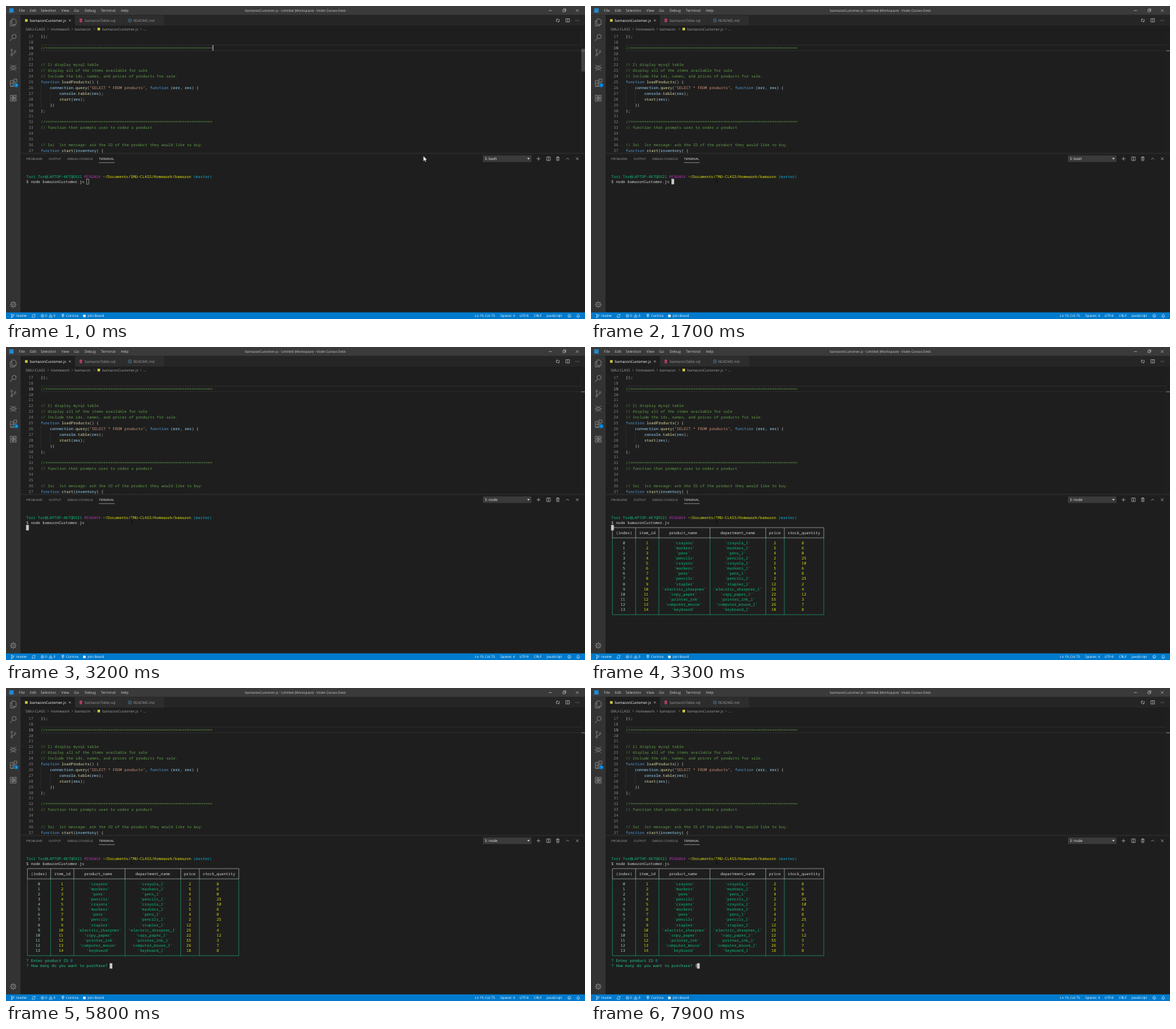
These frames come from a looping animation (800x433 px, 8000 ms). An HTML page:

```html
<!DOCTYPE html>
<html lang="en">
<head>
<meta charset="utf-8">
<title>Editor with terminal</title>
<style>
  html, body { margin: 0; width: 100%; height: 100%; overflow: hidden; background: #1e1e1e; }
  svg { display: block; width: 100vw; height: 100vh; }
  text { white-space: pre; text-rendering: geometricPrecision; }
  .ui { font-family: "Open Sans", "Noto Sans", sans-serif; }
  .mono { font-family: "Noto Sans Mono", "DejaVu Sans Mono", monospace; font-size: 5.35px; }
</style>
</head>
<body>
<svg id="stage" viewBox="0 0 800 433"></svg>
<script>
const CHAR = 3.21, TERM_X = 28, TERM_Y = 235.7, TERM_LINE = 7.083;
const CODE_X = 48, CODE_LINE = 7.9;
const COLORS = {
  c: '#5f9c48', k: '#569cd6', f: '#dcdcaa', v: '#9cdcfe', s: '#ce9178', w: '#d0d0d0',
  g: '#0dbc79', m: '#a535a5', y: '#e0e010', b: '#11a8cd', p: '#23c78b', i: '#a5d6bd'
};

const rect = (x, y, w, h, fill, extra = '') =>
  `<rect x="${x}" y="${y}" width="${w}" height="${h}" fill="${fill}" ${extra}/>`;
const path = (d, stroke = '#c5c5c5', width = .6, extra = '') =>
  `<path d="${d}" stroke="${stroke}" stroke-width="${width}" fill="none" ${extra}/>`;
const circle = (x, y, r, stroke, width = .6, fill = 'none') =>
  `<circle cx="${x}" cy="${y}" r="${r}" stroke="${stroke}" stroke-width="${width}" fill="${fill}"/>`;
const label = (x, y, str, fill = '#ccc', size = 5.04, anchor = 'start') =>
  `<text class="ui" x="${x}" y="${y + 1.75}" fill="${fill}" font-size="${size}" text-anchor="${anchor}">${str}</text>`;
const cross = (x, y, r = 1.8, color) =>
  path(`M${x - r} ${y - r}l${2 * r} ${2 * r}m0 ${-2 * r}l${-2 * r} ${2 * r}`, color);

// Markup: pieces split by "|", each led by a one-letter colour key.
const mono = (x, y, markup) => `<text class="mono" x="${x}" y="${y + 1.8}">` +
  markup.split('|').map(p => `<tspan fill="${COLORS[p[0]]}">${p.slice(1)}</tspan>`).join('') + '</text>';
const codeY = line => 42 + (line - 17) * CODE_LINE;
const termX = col => TERM_X + col * CHAR;
const termY = row => TERM_Y + row * TERM_LINE;
const term = (row, markup) => mono(TERM_X, termY(row), markup);

function titleBar() {
  const menu = [['File', 18], ['Edit', 33], ['Selection', 48], ['View', 76.5], ['Go', 94],
    ['Debug', 108.5], ['Terminal', 131], ['Help', 158.5]];
  return rect(0, 0, 800, 12.5, '#3a3a3a') + rect(4.5, 3.2, 6, 6, '#1f8ad2') +
    menu.map(([name, x]) => label(x, 6.3, name)).join('') +
    label(400, 6.3, 'bamazonCustomer.js - Untitled (Workspace) - Violet Canvas Desk', '#ccc', 4.65, 'middle') +
    path('M750 6.3h4.4M769.5 5h3v3h-3zM770.6 5v-1.1h3v3h-1.1') + cross(789.3, 6.3);
}

function tabs() {
  return rect(20, 12.5, 780, 14.6, '#252526') + rect(20, 12.5, 75, 14.6, '#1e1e1e') +
    rect(95.4, 12.5, 66.4, 14.6, '#2d2d2d') + rect(162.2, 12.5, 56, 14.6, '#2d2d2d') +
    rect(26.3, 18.2, 3.6, 3.6, '#cbcb41') + label(33, 19.9, 'bamazonCustomer.js', '#fff') + cross(88.2, 20, 1.4) +
    rect(101.6, 17.6, 3.6, 4.8, '#d8417f', 'rx="1.4"') + path('M101.6 19.5h3.6m0 1.4h-3.6', '#2d2d2d', .4) +
    label(109, 19.9, 'bamazonTable.sql', '#999') +
    circle(171.3, 20, 2.2, '#519aba') + path('M171.3 18.6v.6m0 .5v1.6', '#519aba') +
    label(176, 19.9, 'README.md', '#999') +
    path('M760.5 22v-3.6h2m-1-1l1 1l-1 1M764.3 18v3.6h-2m1 1l-1-1l1-1M773.6 17.5h5v4.6h-5zM776.1 17.5v4.6') +
    [787.3, 789.3, 791.3].map(x => circle(x, 20, .45, 'none', 0, '#c5c5c5')).join('');
}

function breadcrumbs() {
  const parts = [['SMU-CLASS', 27], ['Homework', 62], ['bamazon', 95], ['bamazonCustomer.js', 133], ['...', 189.5]];
  return parts.map(([name, x]) => label(x, 31.8, name, '#a0a0a0')).join('') +
    [57.5, 91, 121.5, 186].map(x => path(`M${x} 30.6l1.2 1.3l-1.2 1.3`, '#999', .5)).join('') +
    rect(126.4, 30.1, 3.6, 3.6, '#cbcb41');
}

function activityBar() {
  const gray = '#8a8a8a';
  const teeth = Array.from({ length: 8 }, (_, i) => {
    const a = i * Math.PI / 4, c = Math.cos(a), s = Math.sin(a);
    return `M${10 + 3 * c} ${413 + 3 * s}l${1.4 * c} ${1.4 * s}`;
  }).join('');
  return rect(0, 12.5, 20.2, 411.4, '#333') +
    path('M8 18h4l2 2v5.5h-6zM8 20.5h-2v7h6v-2', gray, .8) +
    circle(11.2, 42.2, 2.9, gray, .8) + path('M9 44.5l-3.4 3.8', gray, .9) +
    circle(7.8, 60.8, 1.2, gray, .7) + circle(7.8, 68, 1.2, gray, .7) + circle(12.6, 62.8, 1.2, gray, .7) +
    path('M7.8 62v4.8M12.6 64q0 2-4.8 2.2', gray, .7) +
    circle(10, 85.5, 2.7, gray, .8) +
    path('M10 82.8v5.4M7.3 85.5h-2.3m10 0h-2.3M7.8 83.3l-1.8-2m6.2 2l1.8-2M7.8 87.7l-1.8 2m6.2-2l1.8 2', gray, .7) +
    path('M6 103h4v8h-4zM6 107h8v4h-8M11 101h4v4h-4z', gray, .8) +
    circle(14.2, 109.6, 2.9, 'none', 0, '#007acc') + label(14.2, 109.3, '1', '#fff', 3.6, 'middle') +
    path('M6 123.5h3.4v3.4h-3.4zM10.7 123.5h3.4v3.4h-3.4zM6 128.2h3.4v3.4h-3.4zM10.7 128.2h3.4v3.4h-3.4zM8 125l5 5M13 125l-5 5', gray, .8) +
    circle(10, 413, 3, gray, .8) + circle(10, 413, 1.1, gray, .6) + path(teeth, gray, 1.1);
}

function editor() {
  const rule = 'c//' + '='.repeat(72);
  const code = {
    17: 'w});', 19: rule, 22: 'c// 2) display mysql table',
    23: 'c// display all of the items available for sale',
    24: 'c// Include the ids, names, and prices of products for sale.',
    25: 'kfunction |floadProducts|w() {',
    26: 'v    connection|w.|fquery|w(|s"SELECT * FROM products"|w, |kfunction |w(|verr|w, |vres|w) {',
    27: 'v        console|w.|ftable|w(|vres|w);', 28: 'f        start|w(|vres|w);',
    29: 'w    })', 30: 'w};', 32: rule, 33: 'c// function that prompts user to order a product',
    36: 'c// 3a)  1st message: ask the ID of the product they would like to buy.',
    37: 'kfunction |fstart|w(|vinventory|w) {'
  };
  let out = path('M48 54h747M48 61.8h747', '#303030', .8) +
    path('M48.2 109v31.6M61 117v15.8', '#404040', .4);
  for (let n = 17; n <= 37; n++) {
    out += `<text class="mono" x="37.6" y="${codeY(n) + 1.8}" text-anchor="end" fill="${n === 19 ? '#c6c6c6' : '#858585'}">${n}</text>`;
    if (code[n]) out += mono(CODE_X, codeY(n), code[n]);
  }
  return out + path('M794.9 36v167.5', '#303030', .4) + rect(795, 61.5, 5, .9, '#8c8c8c') +
    rect(795, 59, 5, 31.5, '#797979', 'id="slider"') + rect(285.5, 54, .9, 7.8, '#d0d0d0', 'id="caret"');
}

function panel() {
  const names = [['PROBLEMS', 28], ['OUTPUT', 59], ['DEBUG CONSOLE', 84.5]];
  return rect(20.2, 203.6, 780, 220.4, '#1e1e1e') + path('M20.2 203.9h780', '#454545', .5) +
    names.map(([name, x]) => label(x, 211.3, name, '#969696', 4.35)).join('') +
    label(128.5, 211.3, 'TERMINAL', '#e7e7e7', 4.35) + path('M128.3 216.7h21.8', '#d0d0d0', .5) +
    rect(659, 206.6, 67, 9.2, '#3a3a3a') +
    '<text id="shell" class="ui" x="661.5" y="213" fill="#f0f0f0" font-size="5.04"></text>' +
    '<path d="M720.2 210.2h3.4l-1.7 2.2z" fill="#e0e0e0"/>' +
    path('M733.2 211.3h5.2m-2.6-2.6v5.2M747 208.8h5v5h-5zM749.5 208.8v5') +
    path('M760.2 209.5h4.4M761.5 209.3v-.8h1.8v.8M760.8 209.5v4.3h3.2v-4.3M762.4 210.3v2.8') +
    path('M774 212.3l2-2l2 2') + cross(789.3, 211.3);
}

function statusBar() {
  const names = [['master', 14], ['0', 54], ['0', 65.5], ['Corinna', 83], ['Join Board', 113],
    ['Ln 19, Col 75', 648], ['Spaces: 4', 683], ['UTF-8', 709.5], ['CRLF', 729.5], ['JavaScript', 747]];
  const white = '#fff';
  return rect(0, 423.8, 800, 9.2, '#007acc') +
    names.map(([name, x]) => label(x, 428.5, name, white, 4.65)).join('') +
    circle(8, 426.9, .7, white, .5) + circle(8, 430.7, .7, white, .5) + circle(10.5, 427.7, .7, white, .5) +
    path('M8 427.6v2.4M10.5 428.4q0 1-2.5 1.3', white, .5) +
    path('M36.2 428.5a2 2 0 0 1 3.7-.9M40.2 429a2 2 0 0 1-3.7.9M40.3 426.5v1.3h-1.4M36 431v-1.3h1.4', white, .5) +
    circle(50.4, 428.6, 1.9, white, .5) + cross(50.4, 428.6, .8, white) +
    path('M61.7 426.6l2.1 3.8h-4.2zM61.7 428v1.2', white, .5) +
    path('M78.6 426.4v2.6m-1.4-2.6h2.8v2.6h-2.8zM78.6 429v2', white, .5) +
    rect(106.6, 427, 3.4, 3.4, white) +
    circle(778.3, 428.6, 2, white, .5) + path('M777.2 429.2q1.1 1 2.2 0M777.5 427.7v.5m1.6-.5v.5', white, .5) +
    path('M788.5 430q.7-.6.7-1.8q0-1.7 1.4-1.7t1.4 1.7q0 1.2.7 1.8zM790 430.8h1.2', white, .5);
}

function table() {
  const products = ['crayons', 'markers', 'pens', 'pencils', 'crayons', 'markers', 'pens', 'pencils',
    'stapler', 'electric_sharpner', 'copy_paper', 'printer_ink', 'computer_mouse', 'keyboard'];
  const prices = [2, 5, 4, 2, 2, 5, 4, 2, 12, 25, 22, 55, 26, 18];
  const stock = [8, 6, 0, 25, 10, 6, 8, 25, 2, 4, 12, 3, 7, 8];
  const widths = [9, 9, 21, 23, 7, 16];
  const keys = ['i', 'y', 'g', 'g', 'y', 'y'];
  const center = (cell, w) => {
    const text = String(cell), gap = (w - text.length) / 2;
    return ' '.repeat(gap) + text + ' '.repeat(Math.ceil(gap));
  };
  const row = (cells, colors) => 'w |' + cells.map((c, i) => colors[i] + center(c, widths[i]) + ' ').join('|');

  let out = term(3, row(['(index)', 'item_id', 'product_name', 'department_name', 'price', 'stock_quantity'], 'wwwwww'));
  products.forEach((name, i) => {
    const dept = name === 'crayons' ? 'crayola_1' : name + '_1';
    out += term(5 + i, row([i, i + 1, `'${name}'`, `'${dept}'`, prices[i], stock[i]], keys));
  });

  let col = 0;
  const seps = [0, ...widths.map(w => col += w + 1)].map(c => termX(c + .5));
  const left = seps[0], right = seps[seps.length - 1];
  const [top, mid, bottom] = [2, 4, 19].map(termY);
  const verticals = (y1, y2) => seps.map(x => `M${x} ${y1}V${y2}`).join('');
  return out + path(verticals(mid, bottom) + `M${left} ${bottom}H${right}`, '#1fae78', .55) +
    path(verticals(top, mid) + `M${left} ${top}H${right}M${left} ${mid}H${right}`, '#bccbc4', .55);
}

function terminal() {
  return term(0, 'gTori Tor@LAPTOP-4K7QRX21 |mMINGW64 |y~/Documents/SMU-CLASS/Homework/bamazon |b(master)') +
    term(1, 'w$ node bamazonCustomer.js') +
    `<g id="table">${table()}</g>` +
    `<g id="askId">${term(20, 'p? Enter product ID')}</g><g id="idAnswer"></g>` +
    `<g id="askCount">${term(21, 'p? How many do you want to purchase?')}</g>` +
    `<g id="count">${term(21, 'w' + ' '.repeat(36) + '3')}</g>` +
    '<rect id="block" width="3.2" height="6.9" stroke="#ccc" stroke-width=".5"/>';
}

const pointer = '<g id="pointer">' +
  '<path id="arrow" d="M0 0v7.2l1.7-1.6l1.2 2.6l1.1-.5l-1.2-2.5h2.3z" fill="#fff" stroke="#111" stroke-width=".3"/>' +
  path('M-1.3-3.4h2.6M0-3.4v6.8M-1.3 3.4h2.6', '#0c0c0c', .8, 'id="beam"') + '</g>';

document.getElementById('stage').innerHTML = rect(0, 0, 800, 433, '#1e1e1e') + titleBar() + tabs() +
  breadcrumbs() + editor() + activityBar() + panel() + terminal() + statusBar() + pointer;

const $ = id => document.getElementById(id);
const show = (id, on) => $(id).setAttribute('visibility', on ? 'visible' : 'hidden');
const clamp = v => Math.min(1, Math.max(0, v));

const AT = { focus: 1000, enter: 2000, node: 2400, table: 3300, ask: 3400, id: 5000, ask2: 5500, count: 7000 };
// Cursor cell from each moment on: time, row, column.
const CURSOR = [[0, 1, 26], [AT.enter, 2, 0], [AT.ask, 20, 19], [AT.id, 20, 20], [AT.ask2, 21, 36], [AT.count, 21, 37]];

function draw(t) {
  show('caret', t < 500);
  $('slider').setAttribute('opacity', .4 * (1 - clamp((t - 100) / 800)));
  $('shell').textContent = t < AT.node ? '5: bash' : '5: node';
  show('table', t >= AT.table);
  show('askId', t >= AT.ask);
  $('idAnswer').innerHTML = t < AT.id ? '' : term(20, (t < AT.ask2 ? 'w' : 'b') + ' '.repeat(19) + '8');
  show('askCount', t >= AT.ask2);
  show('count', t >= AT.count);

  const [, row, col] = CURSOR.filter(c => t >= c[0]).pop();
  $('block').setAttribute('x', termX(col));
  $('block').setAttribute('y', termY(row) - 3.4);
  $('block').setAttribute('fill', t < AT.focus ? 'none' : '#ccc');

  const u = clamp((t - 100) / 800), e = u * u * (3 - 2 * u);
  const x = 576.7 - 402.9 * e, y = 207.6 + 32.4 * e;
  $('pointer').setAttribute('transform', `translate(${x} ${y})`);
  show('arrow', y < 218);
  show('beam', y >= 218);
}

function tick() {
  draw(performance.now() % 8000);
  requestAnimationFrame(tick);
}
tick();
</script>
</body>
</html>
```
